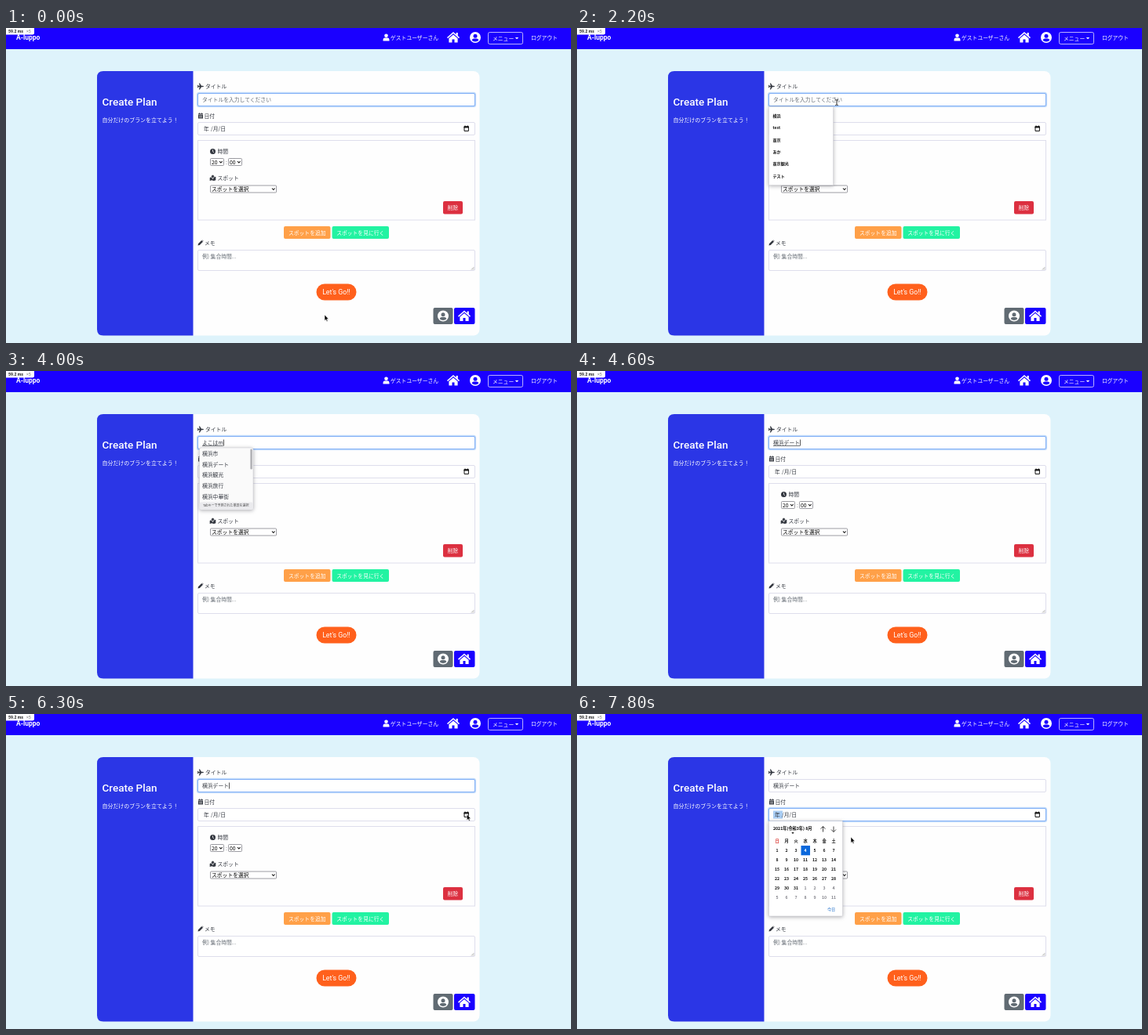
An HTML page that plays this animation: 720 by 402 pixels, repeating every 8000 ms.

```html
<!DOCTYPE html>
<html lang="ja">
<head>
<meta charset="utf-8">
<title>Create Plan</title>
<style>
html, body { margin: 0; width: 100%; height: 100%; overflow: hidden; background: #def3fb; }
svg { display: block; width: 100vw; height: 100vh; }
text { font-family: "Noto Sans CJK JP", "Noto Sans CJK", sans-serif; white-space: pre; }
.latin { font-family: Roboto, "Noto Sans CJK JP", sans-serif; }
.pop { filter: drop-shadow(0 1px 2.5px rgba(60, 60, 70, .4)); }
</style>
</head>
<body>
<svg id="stage" viewBox="0 0 720 402" xmlns="http://www.w3.org/2000/svg"></svg>
<script>
const BLUE = '#1a00ff', INK = '#343840', SOFT = '#666d75', EDGE = '#dedeec', PAPER = '#fefefe', GREY = '#616b73';
const LOOP = 8000, STEP = 100;

// Markup helpers; text takes the vertical centre of its line.
const rect = (x, y, w, h, fill, more = '') =>
  `<rect x="${x}" y="${y}" width="${w}" height="${h}" fill="${fill}" ${more}/>`;
const path = (d, fill, more = '') => `<path d="${d}" fill="${fill}" ${more}/>`;
const line = (d, color, w = 1) => path(d, 'none', `stroke="${color}" stroke-width="${w}"`);
const dot = (x, y, r, fill) => `<circle cx="${x}" cy="${y}" r="${r}" fill="${fill}"/>`;
const text = (x, cy, s, fill = INK, size = 6.8, more = '') =>
  `<text x="${x}" y="${cy + size * .37}" font-size="${size}" fill="${fill}" ${more}>${s}</text>`;
const at = (x, y, body) => `<g transform="translate(${x} ${y})">${body}</g>`;
const group = (id, body, cls = '') => `<g id="${id}" class="${cls}">${body}</g>`;
const MID = 'text-anchor="middle"', BOLD = 'font-weight="700"', MEDIUM = 'font-weight="500"';

const house = fill => path('M-8 0L0-7L3.6-3.8V-6H5.8V-1.9L8 0L7 1.2L0-4.9L-7 1.2Z', fill) +
  path('M-5.6 1.3L0-3.6L5.6 1.3V6.5H1.5V2.6H-1.5V6.5H-5.6Z', fill);
const avatar = (fill, back) => dot(0, 0, 7, fill) + dot(0, -1.8, 2.5, back) +
  path('M-4.4 3.8Q-3.8 1.4-1.6 1.4H1.6Q3.8 1.4 4.4 3.8Q2.6 5.6 0 5.6T-4.4 3.8Z', back);
const person = fill => dot(0, -2.2, 2.3, fill) +
  path('M-4 4.4V3Q-4 .6-1.6 .6H1.6Q4 .6 4 3V4.4Z', fill);
const plane = path('M4 0Q3.7-.8 2.5-.8H1L-1-4H-2.1L-1.2-.8H-2.7L-3.5-1.8H-4.2L-3.7 0L-4.2 1.8H-3.5L-2.7 .8H-1.2L-2.1 4H-1L1 .8H2.5Q3.7 .8 4 0Z', INK);
const diary = path('M-3-2.8H-1.8V-3.8H-1V-2.8H1V-3.8H1.8V-2.8H3V-1.5H-3ZM-3-1H3V3.6H-3Z', INK) +
  line('M-2 .3H2M-2 2H2', PAPER, .6);
const clock = dot(0, 0, 3.5, INK) + line('M0-2.2V.2L1.5 1.3', PAPER, .8);
const map = path('M-3.8-.6L-1.8-1.3L0 1.4L1.8-1.3L3.8-1.8V2.8L1.4 3.6L-1.4 2.8L-3.8 3.6Z', INK) +
  path('M0 .6Q-1.8-1.3-1.8-2.2A1.8 1.8 0 0 1 1.8-2.2Q1.8-1.3 0 .6Z', INK, `stroke="${PAPER}" stroke-width=".4"`);
const pencil = path('M-3.5 3.5L-3 1.2L1.2-3L3-1.2L-1.2 3ZM1.7-3.4L2.2-3.6L3.6-2.2L3.4-1.7Z', INK);
const dateIcon = path('M584 126H589.4V131.4H584Z', 'none', 'stroke="#111" stroke-width="1"') +
  rect(583.5, 125.4, 6.4, 2, '#111') + line('M585 124.5V126M588.4 124.5V126', '#111');

const label = (x, y, icon, s, gap = 6) => at(x, y, icon) + text(x + gap, y, s, INK, 6.8, MEDIUM);
const field = (y, h) => rect(244.5, y + .5, 353, h - 1, '#fff', `rx="1.5" stroke="${EDGE}"`);
const ring = (id, y) => group(id, rect(243.8, y - .2, 354.4, 17.4, 'none', 'rx="2.5" stroke="#c3dcfb" stroke-width="2"') +
  rect(244.5, y + .5, 353, 16, 'none', 'rx="1.5" stroke="#82b0f6"'));
const select = (x, y, w, s) => rect(x + .5, y + .5, w - 1, 9, '#fff', 'rx="1" stroke="#85858c" stroke-width=".8"') +
  text(x + 2, y + 5, s, '#000', 6.8, MEDIUM) + line(`M${x + w - 6} ${y + 4}l1.8 2l1.8-2`, '#111', 1.1);
const button = (x, y, w, h, fill, s) => rect(x, y, w, h, fill, 'rx="2"') +
  text(x + w / 2, y + h / 2, s, '#fff', 6.8, MID);

const header = rect(0, 0, 720, 27, BLUE) +
  text(13, 12, 'A-luppo', '#fff', 8.5, BOLD + ' class="latin"') +
  path('M0 0H36V6Q36 8.5 33.5 8.5H0Z', '#fff') +
  text(3, 4.2, '59.2 ms', '#222', 5.2, BOLD + ' class="latin"') +
  text(26, 4.2, '×5', '#777', 5.2, 'class="latin"') +
  at(484.5, 12, person('#fff')) + text(490, 12, 'ゲストユーザーさん', '#fff') +
  at(570, 12, house('#fff')) + at(598, 12, avatar('#fff', BLUE)) +
  rect(614.5, 5.5, 44, 15, 'none', 'rx="2" stroke="#e2deff" stroke-width=".8"') +
  text(620, 13, 'メニュー', '#fff') + path('M648.8 12H653.2L651 14.2Z', '#fff') +
  text(669, 12, 'ログアウト', '#fff');

const card = rect(116, 55, 487.5, 337.5, PAPER, 'rx="8"') +
  path('M238.5 55V392.5H124Q116 392.5 116 384.5V63Q116 55 124 55Z', '#2b36e6') +
  text(122.5, 94, 'Create Plan', '#fff', 13.5, MEDIUM + ' class="latin"') +
  text(122.5, 117, '自分だけのプランを立てよう！', '#fff', 6.95) +
  label(248, 74.5, plane, 'タイトル') + field(83, 17) +
  label(248, 112, diary, '日付', 4.5) + field(120, 17) + ring('dateRing', 120) +
  group('yearMark', rect(250, 123.5, 12, 10, '#a9cdf3')) +
  text(252, 128.5, '年') + text(261, 128.5, '/月/日') + dateIcon +
  rect(244.5, 143.5, 353, 101.5, 'none', `stroke="${EDGE}"`) +
  label(263.5, 157.5, clock, '時間') + select(260, 166, 18, '20') +
  text(280, 171, ':') + select(283, 166, 18, '00') +
  label(263.5, 191.5, map, 'スポット') + select(260, 200.5, 85, 'スポットを選択') +
  button(557, 221, 25, 16.5, '#dc3040', '削除') +
  button(354, 253, 59.5, 16, '#ffa048', 'スポットを追加') +
  button(415.5, 253, 72.5, 16, '#22f3a2', 'スポットを見に行く') +
  label(248, 274, pencil, 'メモ', 5) + field(283, 27) +
  text(250, 291.5, '例) 集合時間...', SOFT) + line('M593 308.5L596.5 305M595 308.5L596.5 307', '#777', .6) +
  rect(395.5, 326.5, 51, 21, '#ff601c', 'rx="10.5"') +
  text(421, 337, "Let's Go!!", '#fff', 8.8, MID + ' class="latin"') +
  rect(544.5, 357, 25, 21, GREY, 'rx="2"') + at(557, 367.5, avatar('#fff', GREY)) +
  rect(571, 357, 26.5, 21, BLUE, 'rx="2"') + at(584, 367.5, house('#fff'));

const title = ring('titleRing', 83) +
  group('hint', text(250, 91.5, 'タイトルを入力してください', SOFT)) +
  text(250, 91.5, '', INK, 6.8, 'id="value"') +
  rect(250, 95.3, 0, .7, INK, 'id="under"') + rect(250, 87.5, .7, 8, '#111', 'id="caret"');

const past = ['横浜', 'test', '東京', 'あか', '東京観光', 'テスト'];
const history = group('history', rect(244.5, 100.5, 82, 100, '#fff', 'stroke="#d2d2d8" stroke-width=".6"') +
  past.map((s, i) => text(249.5, 112 + i * 15.4, s, '#111', 5.1, BOLD)).join(''), 'pop');

const rowY = i => 105.3 + i * 13.7;
const words = group('words', rect(246.5, 98, 68.5, 79, '#fafafa', 'rx="2.5" stroke="#cbcbd0" stroke-width=".5"') +
  rect(246.5, 167.5, 68.5, 9.3, '#ebebee', 'rx="2"') +
  text(251, 172, 'Tabキーで予測された単語を選択', '#444', 4), 'pop') +
  group('picks', rect(247, 0, 64, 13, '#2a6ae8', 'id="pick" rx="1.5"') +
  [0, 1, 2, 3, 4].map(i => text(250, rowY(i), '', INK, 6.8, `id="word${i}"`)).join('') +
  rect(311.3, 99.5, 2.6, 26, '#b2b2b6', 'id="bar" rx="1.3"'));

function monthGrid() {
  const colX = i => 255 + i * 12;
  let out = [...'日月火水木金土'].map((s, i) => text(colX(i), 162, s, i ? '#111' : '#d8302c', 5.2, MID + ' ' + BOLD)).join('');
  out += rect(285.5, 168, 11.5, 12.3, '#0b68dc');
  for (let i = 0; i < 42; i++) {
    const ink = i === 3 ? '#fff' : i < 31 ? '#111' : '#808088';
    out += text(colX(i % 7), 174.3 + Math.floor(i / 7) * 12.05, i % 31 + 1, ink, 5.2, MID + ' ' + BOLD);
  }
  return out;
}
const calendar = group('calendar', rect(244.5, 136.5, 94, 121.5, '#fff', 'rx="1" stroke="#cbcbd0" stroke-width=".6"') +
  text(250, 146, '2021年(令和3年) 8月', '#000', 5.2, BOLD) + path('M273.3 151H276.7L275 153Z', '#111') +
  line('M313.5 150.5V143.5M310.5 146.5L313.5 143.5L316.5 146.5', '#333', .9) +
  line('M327 143.5V150.5M324 147.5L327 150.5L330 147.5', '#333', .9) +
  monthGrid() + text(324, 249, '今日', '#1468c8', 5.1, MID + ' ' + MEDIUM), 'pop');

const pointer = group('pointer',
  group('arrow', path('M0 0V7.4L1.7 5.9L2.8 8.4L4 7.9L2.9 5.5H5.1Z', '#000', 'stroke="#fff" stroke-width=".5"')) +
  group('beam', line('M-1.8-3.5Q0-3.5 0-2.6Q0-3.5 1.8-3.5M0-2.6V2.6M-1.8 3.5Q0 3.5 0 2.6Q0 3.5 1.8 3.5', '#111', .9)));

const stage = document.getElementById('stage');
stage.innerHTML = header + card + title + history + words + calendar + pointer;
const $ = {};
stage.querySelectorAll('[id]').forEach(el => $[el.id] = el);

const typed = [[0, ''], [2300, 'y'], [2400, 'よ'], [2600, 'よk'], [2700, 'よこ'], [3400, 'よこh'],
  [3600, 'よこは'], [3900, 'よこはm'], [4100, 'よこはま'], [4200, '横浜市'], [4400, '横浜デート']];
const early = ['横浜市', '横並び', '横浜駅', '横須賀線', '予告編'];
const late = ['横浜市', '横浜デート', '横浜観光', '横浜旅行', '横浜中華街'];
const route = [[0, 406, 366], [100, 400, 262], [200, 385, 153], [300, 385, 153], [700, 345, 96],
  [1200, 331, 95], [5100, 331, 95], [5500, 560, 120], [5700, 597, 130], [5900, 588, 128],
  [7000, 586, 128], [7300, 470, 148], [7600, 349, 157]];

const show = (el, on) => el.style.display = on ? '' : 'none';
const between = (t, a, b) => t >= a && t < b;

function spot(t) {
  const i = route.findIndex(k => k[0] > t);
  if (i < 0) return route[route.length - 1].slice(1);
  const [a, b] = [route[i - 1], route[i]], p = (t - a[0]) / (b[0] - a[0]);
  return [a[1] + (b[1] - a[1]) * p, a[2] + (b[2] - a[2]) * p];
}

function drawTitle(t) {
  const value = typed.filter(k => k[0] <= t).pop()[1];
  const inTitle = t < 6400, composing = between(t, 2300, 4800);
  $.value.textContent = value;
  const w = value ? $.value.getComputedTextLength() : 0;
  show($.hint, !value);
  show($.titleRing, inTitle);
  show($.under, composing);
  $.under.setAttribute('width', w);
  $.caret.setAttribute('x', 250 + w + .3);
  show($.caret, inTitle && (composing || t / STEP % 2 === 1));
}

function drawWords(t) {
  const open = between(t, 2500, 4600), more = t >= 3600, list = more ? late : early;
  const chosen = t < 4200 ? -1 : t < 4400 ? 0 : 1;
  show($.words, open);
  show($.picks, open);
  show($.bar, more);
  show($.pick, chosen >= 0);
  $.pick.setAttribute('y', rowY(Math.max(chosen, 0)) - 6.5);
  list.forEach((s, i) => {
    $['word' + i].textContent = s;
    $['word' + i].setAttribute('fill', i === chosen ? '#fff' : INK);
  });
}

function render(ms) {
  const t = Math.floor(ms % LOOP / STEP) * STEP;
  drawTitle(t);
  drawWords(t);
  show($.history, between(t, 1400, 2300));
  show($.dateRing, t >= 6400);
  show($.yearMark, t >= 6400);
  show($.calendar, t >= 7800);
  const [x, y] = spot(t), beam = y > 84 && y < 100;
  $.pointer.setAttribute('transform', `translate(${x} ${y})`);
  show($.pointer, !between(t, 2300, 5200));
  show($.beam, beam);
  show($.arrow, !beam);
}

let start;
function tick(now) {
  if (start === undefined) start = now;
  render(now - start);
  requestAnimationFrame(tick);
}
render(0);
requestAnimationFrame(tick);
</script>
</body>
</html>
```
